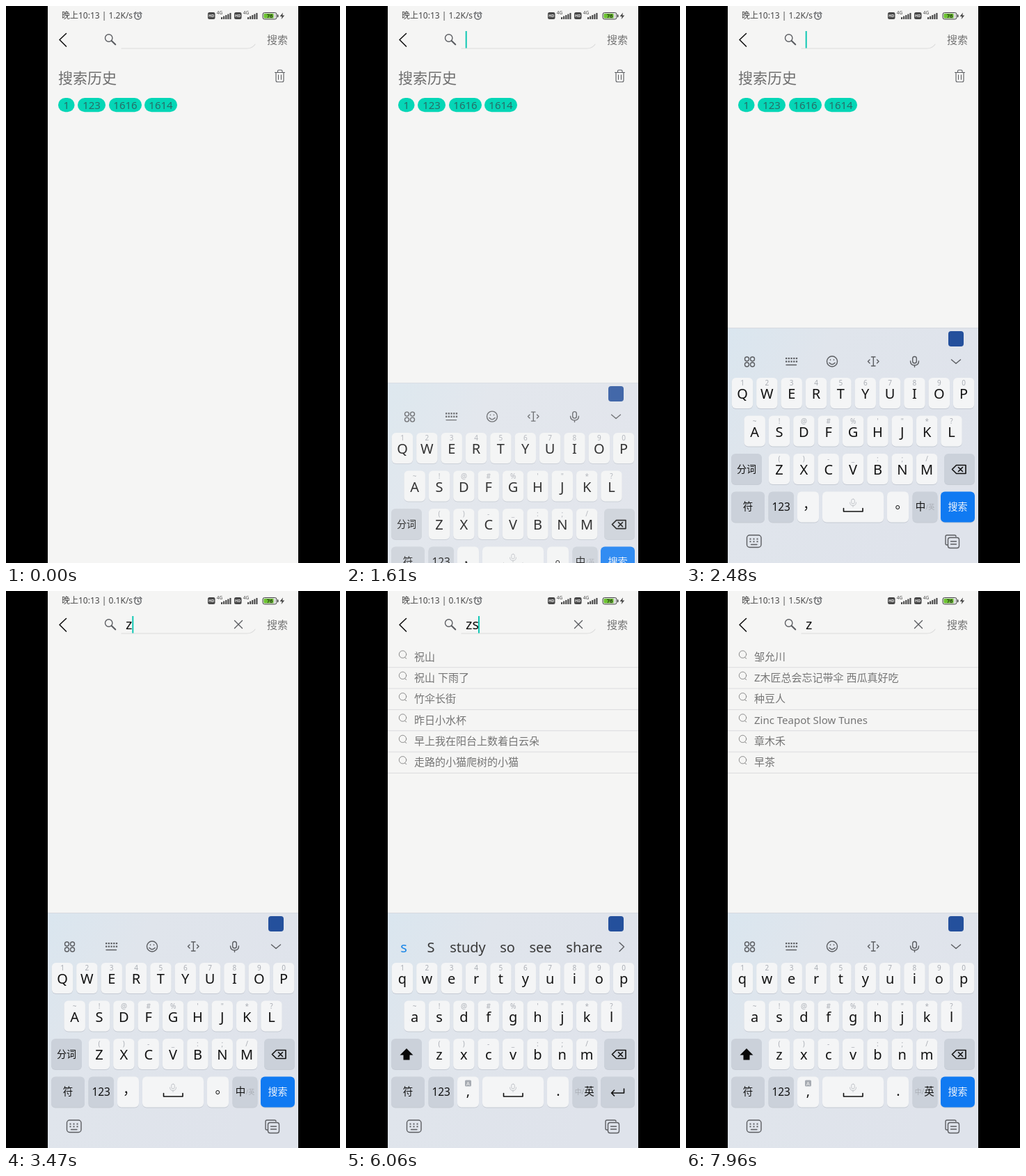
An HTML page for the animation above (8 s loop, 480 px wide and 800 px high).

```html
<!DOCTYPE html>
<html lang="zh">
<head>
<meta charset="utf-8">
<title>搜索</title>
<style>
  html, body { margin: 0; width: 100%; height: 100%; overflow: hidden; background: #000; }
  svg { display: block; width: 480px; height: 800px; }
  text { font-family: "Noto Sans", "Noto Sans CJK SC", "Noto Sans CJK", sans-serif; white-space: pre; }
  .line { fill: none; stroke: #5c5e62; stroke-width: 1.4; stroke-linecap: round; stroke-linejoin: round; }
  .dark { stroke: #101010; stroke-width: 1.6; }
  .thin { stroke: #8c8c8c; stroke-width: 1; }
  .faint { stroke: #c2c5ca; stroke-width: 1; }
</style>
</head>
<body>
<svg id="stage" viewBox="0 0 480 800"></svg>
<script>
const LOOP = 8000;
const PAPER = '#f5f5f4', KEY = '#f4f5f6', GREY = '#cbd1da', DOWN = '#c8ced8';
const INK = '#121212', SOFT = '#757575', HINT = '#a9adb4', STATUS = '#474747';

const rect = (x, y, w, h, r, fill, more = '') =>
  `<rect x="${x}" y="${y}" width="${w}" height="${h}" rx="${r}" fill="${fill}" ${more}/>`;
const text = (s, x, y, size, fill, anchor = 'middle', more = '') =>
  `<text x="${x}" y="${y}" font-size="${size}" fill="${fill}" text-anchor="${anchor}" ${more}>${s}</text>`;
const line = (d, cls = '', more = '') => `<path class="line ${cls}" d="${d}" ${more}/>`;
const ring = (x, y, r, cls = '') => `<circle class="line ${cls}" cx="${x}" cy="${y}" r="${r}"/>`;
const group = (id, body) => `<g id="${id}">${body}</g>`;
const each = (list, fn) => [...list].map(fn).join('');
const MEDIUM = 'font-weight="500"';

// status bar
function signal(x) {
  const bars = [3, 4.5, 6, 7.5, 9].map((h, i) => rect(x + 19 + i * 3.1, 19 - h, 2.1, h, .5, STATUS));
  return rect(x, 9, 10.5, 10, 2.5, STATUS) +
    text('HD', x + 5.2, 16.3, 5.5, PAPER, 'middle', 'font-weight="700"') +
    text('4G', x + 17, 12, 6.5, STATUS) + bars.join('');
}
const status =
  text('', 80, 18, 12, STATUS, 'start', `id="clock" ${MEDIUM}`) +
  ring(189.5, 14.5, 4.6) + line('M189.5 12v2.8l2 1M184 11l2.5-2.2M195 11l-2.5-2.2') +
  signal(290) + signal(328) +
  rect(369, 9.5, 20, 9.5, 2.5, '#dcdedc', `stroke="${STATUS}" stroke-width="1"`) +
  rect(370.5, 11, 14, 6.5, 1, '#6cc430') + rect(390, 12.3, 1.5, 4, .7, STATUS) +
  text('76', 379, 17.2, 7.5, '#263a18', 'middle', 'font-weight="700"') +
  `<path d="M398 9.5l-4.5 5.5h3l-.8 4 4.6-5.6h-3z" fill="${STATUS}"/>`;

// search bar
const bar =
  line('M86.5 39.5L77 48.5L86.5 58', 'dark') +
  line('M166 61H346q8 0 12-6', '', 'style="stroke:#dcdcdc;stroke-width:1.2"') +
  ring(147.7, 46, 5.2) + line('M151.7 50l5.5 5.3', '', 'style="stroke-width:2.2"') +
  text('', 172, 55, 20, INK, 'start', `id="query" ${MEDIUM}`) +
  rect(171.5, 36, 2, 24.5, 0, '#10c8b4', 'id="caret"') +
  group('clear', line('M328.5 42.5l11 11M339.5 42.5l-11 11')) +
  text('搜索', 390, 54, 15, SOFT);

const chips = [['1', 75, 23.5], ['123', 103, 40], ['1616', 148, 47], ['1614', 199, 47]];
const past = group('past',
  text('搜索历史', 75, 110.5, 21, '#6e6e6e', 'start', MEDIUM) +
  line('M386.5 95.5h14M390.5 95v-1.5q0-1.5 1.5-1.5h3.5q1.5 0 1.5 1.5v1.5M388 96v11q0 2 2 2h7q2 0 2-2v-11M391.5 99v6.5M395.5 99v6.5', '', 'style="stroke-width:1.1"') +
  each(chips, ([s, x, w]) => rect(x, 132, w, 20.3, 10.1, '#05d6b6') + text(s, x + w / 2, 147.6, 15, '#286c66')));

const results = (id, rows) => group(id, each(rows, (s, i) => {
  const y = 30.35 * i;
  return ring(81.5, 91 + y, 5.2, 'thin') + line(`M84.5 ${95.5 + y}l2.3 1.5`, 'thin') +
    text(s, 98, 99.7 + y, 15, SOFT, 'start') + rect(60, 109.2 + y, 360, 1, 0, '#dcdcde');
}));
const lists =
  results('one', ['邹允川', 'Z木匠总会忘记带伞 西瓜真好吃', '种豆人', 'Zinc Teapot Slow Tunes', '章木禾', '早茶']) +
  results('two', ['祝山', '祝山 下雨了', '竹伞长街', '昨日小水杯', '早上我在阳台上数着白云朵', '走路的小猫爬树的小猫']);

// keyboard
const key = (x, y, w, fill, id = '') =>
  rect(x, y + 1, w, 44, 6, '#c6cbd4') + rect(x, y, w, 44, 6, fill, id && `id="${id}"`);
const rows = [
  ['qwertyuiop', '1234567890', 81, 534],
  ['asdfghjkl', '~!@#%\'"*?', 98.7, 588.5],
  ['zxcvbnm', '()-_:;/', 134, 643]
];
const caps = each(rows, ([chars, hints, x0, y]) => each(chars, (c, i) => {
  const x = x0 + 35.35 * i;
  return key(x - 15.2, y, 30.4, KEY, 'key-' + c) + text(hints[i], x, y + 11, 10, HINT);
}));
const letters = up => each(rows, ([chars, , x0, y]) =>
  each(chars, (c, i) => text(up ? c.toUpperCase() : c, x0 + 35.35 * i, y + 30, 20, INK, 'middle', MEDIUM)));

const tools = group('tools',
  each([0, 1, 2, 3], i => ring(87.5 + i % 2 * 8, 507 + (i >> 1) * 8, 3)) +
  each(Array(10).fill(0), (_, i) => rect(143 + i % 5 * 3.7, 505 + (i / 5 | 0) * 4.5, 2.3, 2.3, .5, '#5c5e62')) +
  line('M144 515.5h14.5') +
  ring(210, 510.5, 7.5) + line('M206 512.5q4 4.5 8 0M207.5 508v.5M212.5 508v.5') +
  line('M266.5 504h5.5M266.5 517h5.5M269.3 504v13M264 508l-2.5 2.5l2.5 2.5M274.5 508l2.5 2.5l-2.5 2.5') +
  rect(325.7, 503.5, 5.6, 9.5, 2.8, 'none', 'class="line"') +
  line('M322.5 510q0 6 6 6t6-6M328.5 516v2.5M381.5 508l6.5 5.5l6.5-5.5'));

const words = [['S', 122], ['study', 175], ['so', 232], ['see', 279.5], ['share', 342.5]];
const guesses = group('guesses',
  text('', 83, 518.5, 20, '#1b86e6', 'middle', 'id="typed"') +
  group('more', each(words, ([s, x]) => text(s, x, 518.5, 20, '#3a3a3a')) + line('M393 505l6.5 6l-6.5 6.5')));

const zh = group('zh', letters(true) + text('分词', 87, 670, 14, INK) +
  text('，', 177.5, 723, 19, INK) + text('。', 310, 722, 19, INK) +
  text('中', 337, 724, 14.5, INK, 'middle', MEDIUM) + text('/英', 351, 723, 9, HINT));
const en = group('en', letters(false) +
  '<path d="M87 657l9.5 9.5h-5v7h-9v-7h-5z" fill="#080808"/>' +
  text(',', 175.5, 725, 20, INK) + text('.', 305, 725, 20, INK) +
  rect(171, 702.5, 9, 9, 1.5, '#a6abb2') + text('A', 175.5, 710, 7.5, PAPER) +
  text('中/', 335.5, 723, 10, HINT) + text('英', 349.5, 724, 14.5, INK, 'middle', MEDIUM));

const board = group('board',
  rect(60, 462, 360, 340, 0, 'url(#panel)') + rect(60, 462, 360, 1, 0, '#d6dae0') +
  rect(377, 467, 22, 22, 4, '#24509c') +
  tools + guesses + caps +
  key(65, 643, 44, GREY) + key(371, 643, 44, GREY, 'key-del') +
  line('M382.5 665.5l6-6h13.5v12h-13.5zM391.5 662.5l6 6M397.5 662.5l-6 6', 'dark') +
  key(65, 697.5, 48, GREY) + key(118.5, 697.5, 36.5, GREY) + key(160, 697.5, 31, KEY) +
  key(196, 697.5, 88, KEY) + key(289, 697.5, 31, KEY) + key(325.5, 697.5, 36, GREY, 'key-mode') +
  text('符', 89, 724, 14.5, INK) + text('123', 136.7, 725, 15.5, INK, 'middle', MEDIUM) +
  rect(237.7, 708, 4.6, 7, 2.3, 'none', 'class="line faint"') + line('M235.5 713q0 4.5 4.5 4.5t4.5-4.5M240 717.5v2', 'faint') +
  line('M226.5 721.5v4.5h27.5v-4.5', 'dark') + zh + en +
  group('go', key(366, 697.5, 49, '#107af2') + text('搜索', 390.5, 724, 14, '#f0f5fb')) +
  group('enter', key(366, 697.5, 49, GREY) + line('M399.5 715v6h-18M385.5 717l-4 4l4 4', 'dark')) +
  rect(87.5, 760, 20.5, 17.5, 4, 'none', 'class="line"') +
  each([0, 1, 2, 3, 4, 5], i => rect(91.5 + i % 3 * 5, 764.5 + (i / 3 | 0) * 3.7, 2, 2, .5, '#5c5e62')) +
  line('M93.5 773.5h8.5') +
  line('M376 774h-1q-2 0-2-2v-10q0-2 2-2h11q2 0 2 2') +
  rect(376.5, 763.5, 16, 15, 3, 'none', 'class="line"') + line('M380.5 769h8M380.5 773h8'));

document.getElementById('stage').innerHTML = `<defs>
  <clipPath id="phone"><rect x="60" width="360" height="800"/></clipPath>
  <linearGradient id="panel" x2="1" y2=".5">
    <stop stop-color="#dae6ef"/><stop offset=".35" stop-color="#e0e5ec"/><stop offset="1" stop-color="#dfe3eb"/>
  </linearGradient></defs>
  <g clip-path="url(#phone)">${rect(60, 0, 360, 800, 0, PAPER)}${status}${bar}${past}${lists}${board}</g>`;

const el = id => document.getElementById(id);
const show = (id, on) => { el(id).style.display = on ? '' : 'none'; };
const within = (t, a, b) => t >= a && t < b;
const at = (steps, t) => steps.filter(s => t >= s[0]).pop();
const fade = (t, from) => Math.min(1, Math.max(0, (t - from) / 280));

const QUERY = [[0, ''], [3380, 'z'], [4740, 'zs'], [6210, 'z']];
const SPEED = [[0, '1.2'], [2990, '0.1'], [6980, '1.5']];
const GUESS = [[0, ''], [2760, 'z'], [3380, ''], [4740, 's'], [6210, '']];
// the caret blinks every 490 ms, starting again at focus and at each edit
const BLINK = [[1490], [3380], [4740], [6210]];
const PRESS = [['z', 2640, 2760, KEY], ['mode', 4000, 4120, GREY], ['s', 4660, 4780, KEY], ['del', 6100, 6220, GREY]];
const FOCUS = 1490, ENGLISH = 4080;

function draw(t) {
  const query = at(QUERY, t)[1], guess = at(GUESS, t)[1];
  el('clock').textContent = `晚上10:13 | ${at(SPEED, t)[1]}K/s`;
  el('query').textContent = query;
  el('caret').setAttribute('x', [171.7, 181.3, 190][query.length]);
  show('caret', t >= FOCUS && Math.floor((t - at(BLINK, t)[0]) / 495) % 2 === 0);
  show('clear', query);
  show('past', !query);
  show('zh', t < ENGLISH);
  show('en', t >= ENGLISH);
  show('tools', !guess);
  show('guesses', guess);
  show('more', guess === 's');
  show('go', !guess);
  show('enter', guess);
  el('typed').textContent = guess;
  for (const [k, a, b, fill] of PRESS) el('key-' + k).setAttribute('fill', within(t, a, b) ? DOWN : fill);

  const second = fade(t, 5000) - fade(t, 6720);
  el('one').setAttribute('opacity', fade(t, 3880) - second);
  el('two').setAttribute('opacity', second);

  // keyboard rises on a critically damped spring
  const s = Math.max(0, t - FOCUS) / 1000, w = 23 * s;
  show('board', s > 0);
  el('board').setAttribute('transform', `translate(0 ${(338 * (1 + w) * Math.exp(-w)).toFixed(2)})`);
  el('board').setAttribute('opacity', Math.min(1, s / .142));
}

const start = performance.now();
function tick() {
  draw((performance.now() - start) % LOOP);
  requestAnimationFrame(tick);
}
tick();
</script>
</body>
</html>
```
